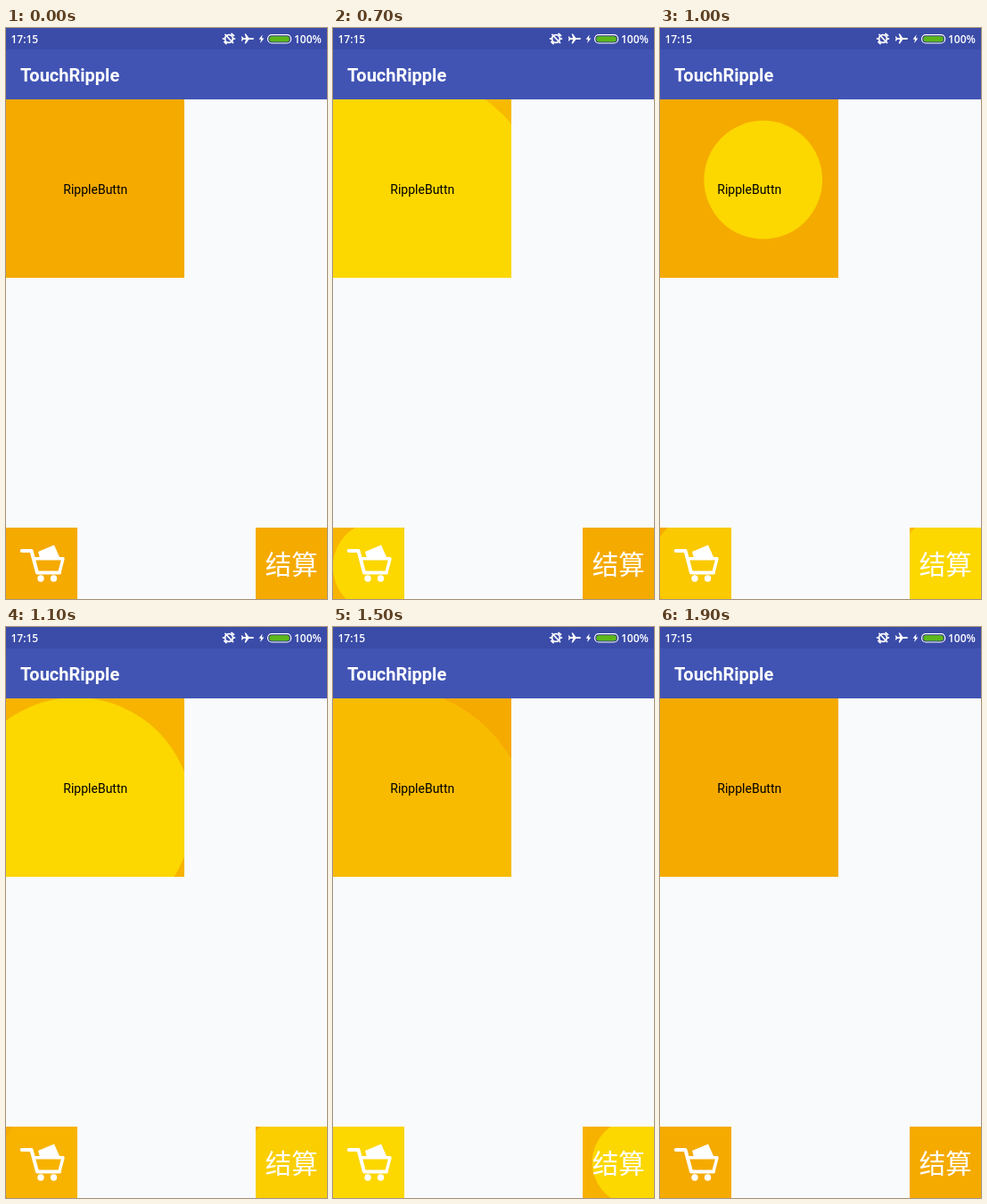
Recreate the animation shown at these times as an HTML page. Size 360x640 px, loop 2000 ms.

```html
<!DOCTYPE html>
<html lang="en">
<head>
<meta charset="utf-8">
<title>TouchRipple</title>
<style>
  html, body { margin: 0; width: 100%; height: 100%; overflow: hidden; background: #f9fafc; }
  svg { display: block; width: 100%; height: 100%; }
  .status { font: 600 12px "Open Sans", "Noto Sans", sans-serif; fill: #fff; }
  .title { font: 700 20px Roboto, sans-serif; fill: #fff; }
  .label { font: 14px Roboto, sans-serif; fill: #000; }
  .pay { font: 300 29.5px "Noto Sans CJK SC", "Noto Sans CJK", sans-serif; fill: #fff; }
  .line { fill: none; stroke: #fff; stroke-linecap: round; stroke-linejoin: round; }
</style>
</head>
<body>
<svg viewBox="0 0 360 640">
  <rect width="360" height="640" fill="#f9fafc"/>
  <rect width="360" height="80" fill="#4154b4"/>
  <rect width="360" height="24" fill="#3a4ba8"/>

  <text class="status" x="5.5" y="17">17:15</text>
  <g class="line" stroke-width="1.8">
    <circle cx="250" cy="12" r="4.4"/>
    <path d="M246 7.500l8.500 9M243.600 12h1M255.400 12h1M253 6.500l2.500 2M247 17.500l-2-2"/>
  </g>
  <path fill="#fff" d="M278 12q0 .9-1.500 .9h-4.200L269 17.500h-1.400l1.500-4.600h-3L264.800 14.500H263.800l.7-2.500-.7-2.500h1l1.300 1.600h3L267.600 6.500h1.400l3.300 4.600h4.200q1.500 0 1.500 .9z"/>
  <path fill="#fff" d="M287.600 7.500l-4 5.300h2.400l-.8 4.200 4.200-5.600h-2.500z"/>
  <rect x="293.600" y="7.600" width="26" height="9.400" rx="4.500" fill="#2d3a86" stroke="#fff" stroke-width="1.200"/>
  <rect x="295.300" y="9.200" width="22.600" height="6.200" rx="3" fill="#5cb81a"/>
  <text class="status" x="323" y="17">100%</text>
  <text class="title" x="16" y="60">TouchRipple</text>

  <g id="buttons"></g>

  <text class="label" x="100.300" y="186" text-anchor="middle">RippleButtn</text>
  <g class="line">
    <path stroke-width="4" d="M17.800 586H28.500l6.500 24.500H60"/>
    <path stroke-width="3.400" d="M32 594.700H64L60 610"/>
  </g>
  <path fill="#fff" d="M36 587L54 579.500L60.500 594H38z"/>
  <circle cx="39" cy="617" r="3.700" fill="#fff"/>
  <circle cx="53.500" cy="617" r="3.700" fill="#fff"/>
  <text class="pay" x="320.300" y="612" text-anchor="middle">结算</text>
</svg>
<script>
const LOOP = 2000, STEP = 100, GROW = 300, FADE = 200;
const ORANGE = '#f5aa00', YELLOW = '#fcd700';

// Each tap: press and release time, centre, end radius, optional drift of the centre.
const buttons = [
  { x: 0, y: 80, size: 200, taps: [
    { down: 305, up: 760, x: 77, y: 210, r: 160 },
    { down: 930, up: 1375, x: 154.5, y: 129.4, r: 161, dx: -94, dy: 99 }
  ] },
  { x: 0, y: 560, size: 80, taps: [
    { down: 520, up: 940, x: 51, y: 604, r: 61 },
    { down: 1270, up: 1580, x: 43, y: 608, r: 68 }
  ] },
  { x: 280, y: 560, size: 80, taps: [
    { down: 740, up: 1060, x: 325, y: 605, r: 60 },
    { down: 1350, up: 1700, x: 339.5, y: 600, r: 65 }
  ] }
];

const clamp = v => Math.min(1, Math.max(0, v));
const easeOut = v => 1 - (1 - v) ** 2;

function add(parent, tag, attrs) {
  const el = document.createElementNS('http://www.w3.org/2000/svg', tag);
  set(el, attrs);
  return parent.appendChild(el);
}

function set(el, attrs) {
  for (const key in attrs) el.setAttribute(key, attrs[key]);
}

const root = document.getElementById('buttons');
buttons.forEach((b, i) => {
  const box = { x: b.x, y: b.y, width: b.size, height: b.size };
  add(add(root, 'clipPath', { id: 'clip' + i }), 'rect', box);
  add(root, 'rect', { ...box, fill: ORANGE });
  b.tint = add(root, 'rect', { ...box, fill: YELLOW });
  const layer = add(root, 'g', { 'clip-path': `url(#clip${i})` });
  b.wave = add(layer, 'circle', { fill: YELLOW });
});

function drawButton(b, t) {
  const tap = b.taps.find(p => t >= p.down && t < p.up + FADE);
  if (!tap) {
    set(b.tint, { opacity: 0 });
    set(b.wave, { opacity: 0 });
    return;
  }
  const { x, y, r, dx = 0, dy = 0 } = tap;
  const age = t - tap.down;
  const k = easeOut(clamp(age / GROW));
  set(b.tint, { opacity: t < tap.up ? 0.35 * clamp((age - 90) / 150) : 0 });
  set(b.wave, {
    cx: x + dx * k, cy: y + dy * k, r: r * k,
    opacity: 1 - clamp((t - tap.up) / FADE)
  });
}

function draw(time) {
  const t = Math.floor((time % LOOP) / STEP) * STEP;
  buttons.forEach(b => drawButton(b, t));
}

const start = performance.now();
function tick() {
  draw(performance.now() - start);
  requestAnimationFrame(tick);
}
tick();
</script>
</body>
</html>
```
